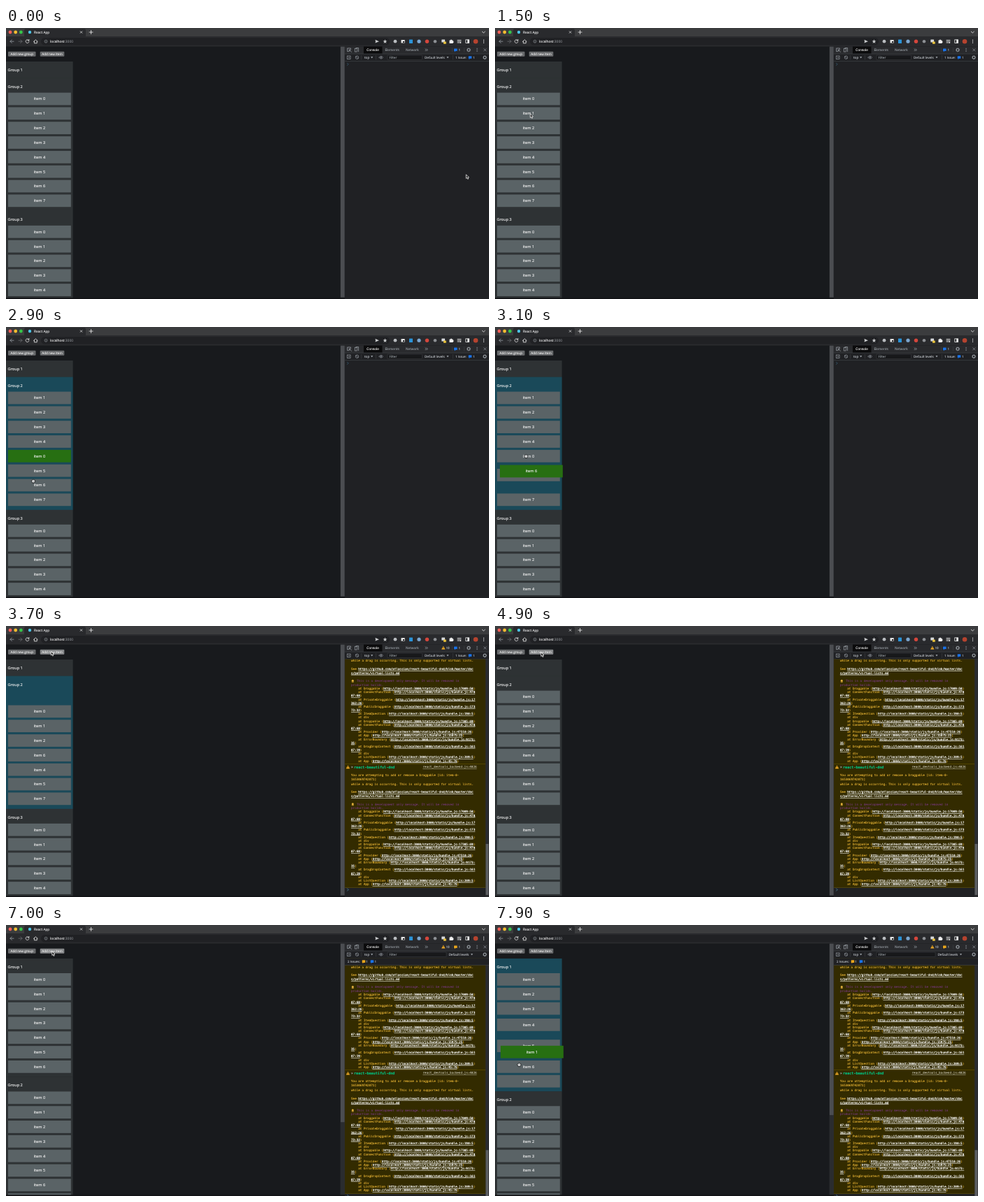
An HTML page that plays this animation: 690x388 px, repeating every 8000 ms.

```html
<!DOCTYPE html>
<html lang="en">
<head>
<meta charset="utf-8">
<title>React App</title>
<style>
html, body { margin: 0; width: 100%; height: 100%; overflow: hidden; background: #181a1d; }
svg { display: block; width: 100%; height: 100%; }
text { font-family: "Open Sans", "Noto Sans", sans-serif; white-space: pre; text-rendering: geometricPrecision; stroke-width: .12; }
.mono { font-family: "DejaVu Sans Mono", monospace; }
.link { fill: #fff; stroke: #fff; stroke-width: .2; text-decoration: underline; text-decoration-thickness: .6px; }
</style>
</head>
<body>
<svg id="stage" viewBox="0 0 690 388" xmlns="http://www.w3.org/2000/svg"></svg>
<script>
const LOOP = 8000, STEP = 100, PITCH = 20.83, TOP = 48, HEAD = 23.6;
const INK = '#f0f0f0', DIM = '#9aa0a6', WARN = '#e9b535', BLUE = '#1a73e8', BAR = '#292a2d';

// drawing helpers
const rect = (x, y, w, h, fill, more = '') =>
  `<rect x="${x}" y="${y}" width="${w}" height="${h}" fill="${fill}" ${more}/>`;
const dot = (x, y, r, fill, more = '') => `<circle cx="${x}" cy="${y}" r="${r}" fill="${fill}" ${more}/>`;
const line = (d, color = DIM, w = 0.8) =>
  `<path d="${d}" fill="none" stroke="${color}" stroke-width="${w}" stroke-linecap="round" stroke-linejoin="round"/>`;
const fill = (d, color) => `<path d="${d}" fill="${color}"/>`;
const text = (x, y, size, str, color = INK, more = '') =>
  `<text x="${x}" y="${y + size * 0.35}" font-size="${size}" fill="${color}" stroke="${color}" ${more}>${str}</text>`;
const caret = (x, y) => fill(`M${x - 1.5} ${y - 1}h3l-1.5 2.4z`, DIM);
const dots = (x, y, c = INK) => [-2, 0, 2].map(d => dot(x, y + d, 0.6, c)).join('');
const cross = (x, y, r, c = INK) => line(`M${x - r} ${y - r}l${2 * r} ${2 * r}m0 ${-2 * r}l${-2 * r} ${2 * r}`, c, 0.7);
const gear = (x, y) => dot(x, y, 1.9, 'none', `stroke="${DIM}" stroke-width="1.1"`) +
  dot(x, y, 2.6, 'none', `stroke="${DIM}" stroke-width=".6" stroke-dasharray="1 1.04"`);
const badge = (x, y, c) => rect(x - 2.3, y - 2, 4.6, 3.6, c, 'rx=".5"') + fill(`M${x - 1.5} ${y + 1.4}v1.6l1.6-1.6z`, c);
const warnSign = (x, y) => fill(`M${x} ${y - 2.5}l2.7 4.8h-5.4z`, '#f2ab26') + rect(x - 0.3, y - 1, 0.6, 1.7, '#332b00');

// timing helpers
const clamp = v => Math.max(0, Math.min(1, v));
function track(t, keys) {
  let a = keys[0];
  for (const b of keys) {
    if (t < b[0]) {
      const p = clamp((t - a[0]) / (b[0] - a[0]));
      return [a[1] + (b[1] - a[1]) * p, a[2] + (b[2] - a[2]) * p];
    }
    a = b;
  }
  return [a[1], a[2]];
}

function browser() {
  let s = rect(0, 0, 690, 13, '#3b3c3e') + rect(26, 1, 88, 12, BAR, 'rx="2.5"') + rect(0, 12, 690, 14.5, BAR);
  ['#f25e57', '#f5bd2f', '#35c648'].forEach((c, i) => s += dot(6 + i * 7.7, 6, 2.4, c));
  s += dot(34, 6, 2.2, '#4cc3e6') + text(40, 6, 4.75, 'React App') + cross(107.5, 6, 1.3);
  s += line('M119 6h5m-2.5-2.5v5', INK) + line('M680.3 5.2l2 1.8 2-1.8', INK);
  s += line('M11 19.2H6m2.3-2.3L6 19.2l2.3 2.3') + line('M18 19.2h5m-2.3-2.3l2.3 2.3-2.3 2.3', '#6c6f73');
  s += line('M32.6 17.8a2.4 2.4 0 1 0 .3 2m0-3.3v1.6h-1.7', INK) + line('M39.5 19.4l2.8-2.6 2.8 2.6m-4.7-.4v2.8h3.8V19', INK);
  s += rect(50, 14, 498, 10.5, '#202124', 'rx="5.2"');
  s += dot(57, 19.2, 2, 'none', `stroke="${DIM}" stroke-width=".6"`) + rect(56.7, 18.8, 0.6, 1.5, DIM);
  s += text(63, 19.2, 4.9, 'localhost<tspan fill="#a9adb2" stroke="none">:3000</tspan>');
  s += fill('M527.5 16.8l5.5 2.4-5.5 2.4.5-2.4z', '#c6c8ca');
  s += fill('M541.5 16.3l.8 2 2.1.2-1.6 1.3.5 2.1-1.8-1.1-1.8 1.1.5-2.1-1.6-1.3 2.1-.2z', '#c6c8ca');
  s += dot(556, 19.2, 2.4, '#b9bcc0') + rect(564.5, 17, 5.2, 4.6, '#e4e4e4', 'rx=".6"') + rect(567, 19, 2, 2, BAR);
  s += rect(576, 16.5, 5, 5.4, '#2b93d8', 'rx=".5"') + dot(590, 19.2, 2.6, '#7ba7d0') + dot(601.5, 19.2, 2.7, '#d5463c');
  s += dot(613, 19.2, 2.3, '#8d9094') + rect(622.3, 16.6, 4.8, 4, '#d8d9da', 'rx=".5"') + rect(625, 19.4, 3.8, 3.4, '#e8c23b', 'rx=".5"');
  s += fill('M633.5 17.5h1.5a1 1 0 0 1 2 0h1.6v1.5a1 1 0 0 1 0 2v1h-5.1z', INK);
  s += line('M645 17.4h5m-5 1.8h5m-5 1.8h2.8', INK) + dot(649.3, 21, 0.9, INK);
  s += rect(656.8, 16.8, 4.8, 4.8, 'none', `stroke="${INK}" stroke-width=".8"`) + rect(659.2, 16.8, 2.4, 4.8, INK);
  return s + dot(671, 19.2, 3.3, '#b6432f') + dots(682.5, 19.2);
}

function tools() {
  let s = rect(484, 26.5, 206, 361.5, '#202124') + rect(484, 26.5, 206, 10.5, BAR) + rect(511, 26.5, 26.5, 10.3, '#0b0b0c');
  s += rect(484, 36.8, 206, 0.5, '#494c50') + rect(484, 47, 206, 0.5, '#494c50');
  s += line('M492.5 30V29h-4.8v4.6h1.6m1-2.4l3.2 3.2m-3.2-3.2v2.3m0-2.3h2.3');
  s += rect(498.5, 29.4, 3, 4.6, 'none', `stroke="${DIM}" stroke-width=".7"`) + line('M500 28.6h3.6v5.2');
  s += text(515.3, 31.4, 4.7, 'Console', '#fff') + text(541.5, 31.4, 4.7, 'Elements', DIM) + text(571, 31.4, 4.7, 'Network', DIM);
  s += line('M599 30l1.4 1.4-1.4 1.4m2-2.8l1.4 1.4-1.4 1.4');
  s += gear(661, 31.4) + dots(673, 31.4, DIM) + cross(684.3, 31.4, 1.6, DIM);
  s += rect(487.3, 40, 4.8, 4.4, 'none', `stroke="${DIM}" stroke-width=".7"`) + fill('M489.5 41l1.6 1.2-1.6 1.2z', DIM);
  s += dot(501.5, 42.2, 2.2, 'none', `stroke="${DIM}" stroke-width=".7"`) + line('M500 40.7l3 3', DIM, 0.7);
  s += text(512, 42.2, 4.6, 'top', '#bdc1c6') + caret(522.7, 42);
  s += line('M533 42.2q2.8-3.8 5.6 0q-2.8 3.8-5.6 0', DIM, 0.7) + dot(535.8, 42.2, 0.9, DIM);
  return s + rect(507, 39, 0.4, 6.5, '#494c50') + rect(528, 39, 0.4, 6.5, '#494c50') + gear(684, 42.2);
}

// one console line, wrapped by character count, with its address underlined
function wrapped(str, y, step) {
  const CH = 69, W = 2.57;
  let from = str.indexOf('http'), to = str.endsWith(')') ? str.length - 1 : str.length, out = '';
  if (from < 0) from = to = str.length;
  for (let a = 0; a < str.length; a += CH, y += step) {
    const b = Math.min(a + CH, str.length);
    const cut = (p, q) => str.slice(Math.max(a, p), Math.max(a, Math.min(b, q)));
    const lead = a ? 0 : str.search(/\S/);
    out += text(493 + lead * W, y, 4.27,
      `${cut(lead, from)}<tspan class="link">${cut(from, to)}</tspan>${cut(to, str.length)}`, WARN, 'class="mono"');
  }
  return [out, y];
}

const CALLS = 'Draggable 17009:58,ConnectFunction 47887:68,PrivateDraggable 17362:26,PublicDraggable 17373:32,' +
  'ItemQuestion 190:5,div,Droppable 17385:69,ConnectFunction 47887:68,Provider 47510:26,App 15975:25,' +
  'ErrorBoundary 9173:35,DragDropContext 16187:19,div,ListQuestion 209:5,App 45:76';

function message(y) {
  const mono = (dy, str, c = WARN, x = 493) => text(x, y + dy, 4.27, str, c, 'class="mono"');
  let s = mono(0, 'while a drag is occurring. This is only supported for virtual lists.');
  s += mono(11.5, 'See <tspan class="link">https://github.com/atlassian/react-beautiful-dnd/blob/master/doc</tspan>');
  s += mono(17.3, '<tspan class="link">s/patterns/virtual-lists.md</tspan>');
  s += dot(495.3, y + 28.2, 1.5, '#e2b13c') + rect(493.8, y + 29.4, 3, 1.4, '#b98a2c');
  s += mono(28.6, 'This is a development only message. It will be removed in', '#723874', 501);
  s += mono(34.2, 'production builds.', '#723874');
  let at = y + 39.5;
  for (const call of CALLS.split(',')) {
    const [name, pos] = call.split(' ');
    const [out, next] = wrapped(`    at ${name}` + (pos ? ` (http://localhost:3000/static/js/bundle.js:${pos})` : ''), at, 5.18);
    s += out;
    at = next;
  }
  return s;
}

function warnings() {
  let s = rect(484, 36, 201, 338, '#332b00') + message(50) + rect(484, 197, 201, 0.6, '#665500');
  s += warnSign(488.5, 202) + fill('M493.6 200.6l2.2 1.4-2.2 1.4z', DIM);
  s += text(497, 202, 5.12, 'react-beautiful-dnd', '#00c584', 'class="mono" font-weight="bold"');
  s += text(595.5, 201.6, 4.27, 'react_devtools_backend.js:4026', '#c4c1b0', 'class="mono" text-decoration="underline"');
  s += text(493, 213.2, 4.27, 'You are attempting to add or remove a Draggable [id: item-0-', WARN, 'class="mono"');
  s += text(493, 219.6, 4.27, '1653069742871]', WARN, 'class="mono"');
  s += message(226.5) + rect(484, 374, 201, 0.6, '#665500') + line('M487.6 376l1.6 1.6-1.6 1.6', '#5db0d7', 0.6);
  return s + rect(685, 36, 5, 352, '#2a2b2e') + rect(685.4, 312, 4, 73, '#5c5e61');
}

// toolbar pieces that depend on how many issues are known
function issues(warned, two) {
  let s = rect(545, 39, two ? 84 : 49.5, 6.6, '#17181a', 'stroke="#494c50" stroke-width=".4"');
  s += text(547.5, 42.2, 4.6, 'Filter', DIM);
  const x = two ? 632.5 : 598;
  s += text(x, 42.2, 4.6, 'Default levels', '#bdc1c6') + caret(x + 33, 42);
  if (!two) s += rect(638, 39, 0.4, 6.5, '#494c50') + text(642, 42.2, 4.5, '1 Issue:', '#bdc1c6') + badge(663, 42.2, BLUE) + text(667, 42.2, 4.5, '1', '#bdc1c6');
  if (warned) s += warnSign(624.8, 31.2) + text(628.5, 31.4, 4.5, '10', '#bdc1c6');
  s += rect(637, 28.5, 0.4, 6, '#494c50') + badge(642.3, 31.4, two ? '#e8a51c' : BLUE) + text(646.5, 31.4, 4.5, '1', '#bdc1c6') + rect(654, 28.5, 0.4, 6, '#494c50');
  if (two) {
    s += rect(484, 47.5, 206, 10, '#202124') + rect(484, 57.3, 206, 0.5, '#494c50') + text(488, 52.3, 4.5, '2 Issues:', '#bdc1c6');
    s += badge(511, 52.3, '#e8a51c') + text(514.3, 52.3, 4.5, '1', '#bdc1c6') + badge(523, 52.3, BLUE) + text(526.5, 52.3, 4.5, '1', '#bdc1c6');
  }
  return s;
}

// lists of items
const list = labels => labels.map((label, i) => ({ label, x: 0, y: i * PITCH }));
const count = n => list([...Array(n).keys()]);

// carries one item along keys while its neighbours give way at the given times
function drag(items, from, dir, passes, keys, t) {
  passes.forEach((at, j) => items[from + dir * (j + 1)].y -= dir * PITCH * clamp((t - at) / 200));
  const [x, y] = track(t, keys), item = items[from];
  item.x = x;
  item.y += y;
  item.held = true;
  return items;
}

const ADDED = [5700, 5900, 6100, 6400, 6600, 6800, 6900, 7100];

function firstList(t) {
  const items = count(ADDED.filter(a => t >= a).length);
  if (t < 7500) return items;
  return drag(items, 1, 1, [7560, 7640, 7724, 7814], [[7400, 0, 0], [7500, 1, 10], [7700, 4, 48], [7900, 5, 83]], t);
}

function secondList(t) {
  if (t >= 2000 && t < 3000)
    return drag(count(8), 0, 1, [2000, 2070, 2310, 2470],
      [[1900, 0, 0], [2100, 3, 15], [2300, 10, 57.6], [2500, 8, 80], [2700, 6, 90], [2900, 0, 4 * PITCH]], t);
  if (t >= 3000 && t < 3600)
    return drag(list([1, 2, 3, 4, 0, 5, 6, 7]), 6, -1, [3040, 3100, 3160, 3220, 3280, 3340],
      [[3000, 0, 0], [3100, 4, -20], [3300, 18, -105], [3500, 27, -178]], t);
  const items = count(8);
  if (t >= 3600 && t < 4100) {
    const back = clamp((t - 3800) / 300);
    for (let i = 0; i < 6; i++) items[i].y += PITCH * (1 - back);
    items[6].y -= 2 * PITCH * (1 - back);
    items.push(items.splice(6, 1)[0]);
  }
  return items;
}

function itemBox(item, top) {
  const x = 3 + item.x, y = top + 21 + item.y;
  return rect(x, y, 89.8, 17.8, item.held ? '#276f12' : '#5a6366') +
    text(x + 44.9, y + 8.9, 5.6, 'item ' + item.label, INK, 'text-anchor="middle"');
}

function page(t) {
  const groups = [
    [firstList(t), t >= 7500],
    [secondList(t), t >= 2000 && t < 3900],
    [count(8), false]
  ];
  let s = '', held = '', top = TOP;
  groups.forEach(([items, lit], i) => {
    const h = HEAD + items.length * PITCH;
    s += rect(0, top, 95.6, h + 0.3, lit ? '#1a4959' : '#2e3234') + text(2.6, top + 12, 5.6, 'Group ' + (i + 1));
    for (const item of items) {
      if (item.held) held += itemBox(item, top);
      else s += itemBox(item, top);
    }
    top += h;
  });
  const added = groups[0][0].length * PITCH;
  const bar = rect(477.6, 26.5, 6.4, 361.5, '#2a2c2f') + rect(478, 26.5, 5.6, 360 * 360 / (361 + added), '#4b4d51');
  return [s + bar + rect(0, 386.3, 484, 1.7, '#121316'), held];
}

function button(x, w, label, hover) {
  return rect(x, 33.7, w, 7, hover ? '#858789' : '#696b6d', 'rx="1"') +
    text(x + w / 2, 37.2, 4.6, label, '#f2f2f2', 'text-anchor="middle"');
}

const PATH = [
  [0, 659, 213], [600, 286, 128], [700, 286, 128], [900, 129, 68], [1100, 129, 68], [1500, 52, 126], [1800, 33, 109],
  [2000, 33, 112], [2300, 43.5, 166.5], [2700, 40, 204], [2900, 39, 220.5], [3000, 39, 220.5], [3500, 66, 43],
  [3700, 66, 39.5], [4600, 67.5, 41], [7100, 67.5, 41], [7400, 29, 104], [7700, 32, 155], [7900, 34.5, 200]
];

function pointer(t) {
  const [x, y] = track(t, PATH);
  const hand = (t >= 1700 && t < 3600) || t >= 7400;
  const d = hand
    ? 'M-2.6-.6Q-2.2-1.6-1.4-1.4Q-1-2.6 0-2.2Q1-2.6 1.4-1.6Q2.6-1.7 2.6-.4L2.2 1.6 1.6 2.6H-1.4L-2.4 1z'
    : 'M-1.7-3.2V2.4L-.4 1.2.6 3.4 1.6 2.9.6.9H2.4z';
  return `<path transform="translate(${x} ${y})" d="${d}" fill="${hand ? '#c9cbcc' : '#111'}" stroke="${hand ? '#16181a' : '#f4f4f4'}" stroke-width=".8"/>`;
}

const stage = document.getElementById('stage');
stage.innerHTML = `<defs><clipPath id="pane"><rect x="484" y="47.5" width="206" height="340.5"/></clipPath></defs>
  ${rect(0, 0, 690, 388, '#181a1d')}<g id="page"></g>${browser()}${tools()}
  <g id="prompt">${line('M487.6 50.3l1.6 1.6-1.6 1.6', '#3f6f8c', 0.6)}</g>
  <g clip-path="url(#pane)"><g id="log">${warnings()}</g></g><g id="top"></g>`;
const part = id => document.getElementById(id);

function draw(t) {
  const warned = t >= 3600, two = t >= 5800;
  const [body, held] = page(t);
  part('page').innerHTML = body + button(3, 39.5, 'Add new group', false) +
    button(48.7, 34.6, 'Add new item', t >= 3500 && t < 7200);
  part('prompt').style.display = warned ? 'none' : '';
  part('log').style.display = warned ? '' : 'none';
  part('log').setAttribute('transform', `translate(0 ${two ? 10.3 : 0})`);
  part('top').innerHTML = issues(warned, two) + held + pointer(t);
}

let shown = -1;
function tick() {
  const t = Math.floor(performance.now() % LOOP / STEP) * STEP;
  if (t !== shown) draw(shown = t);
  requestAnimationFrame(tick);
}
tick();
</script>
</body>
</html>
```
